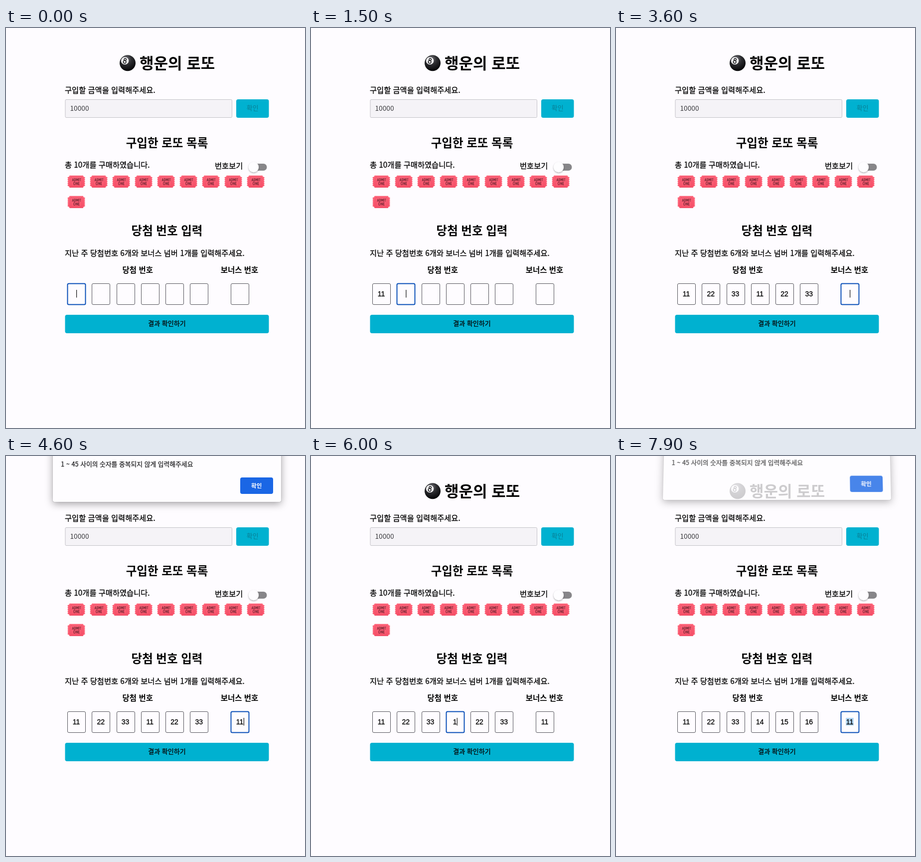
These frames come from a looping animation (600 by 802 pixels, 8000 ms). An HTML page:

```html
<!DOCTYPE html>
<html lang="ko">
<head>
<meta charset="utf-8">
<title>행운의 로또</title>
<style>
  html, body { margin: 0; width: 100%; height: 100%; overflow: hidden; background: #fefcff; }
  body { position: relative; font-family: "Noto Sans CJK KR", "Noto Sans CJK", sans-serif; }
  #page { position: absolute; left: 0; top: 0; }
  text { font-size: 15.3px; fill: #060606; stroke: #060606; stroke-width: .3px; }
  .bold { font-weight: 700; stroke: none; font-size: 15.5px; }
  .h1 { font-size: 31px; }
  .h2 { font-size: 23.5px; }
  .button { font-size: 13px; }
  .faint { fill: #087f95; stroke: none; }
  .amount { font-size: 13.7px; fill: #3a3a3e; stroke: none; }
  .mid { text-anchor: middle; }
  .cell { fill: #fefcff; stroke: #55555c; }
  .cell.on { stroke: #0b50b8; stroke-width: 2; }
  .num { font: 14px "Liberation Sans", Arial, sans-serif; }
  #dialog {
    position: absolute; left: 94px; top: -60px; width: 458px; height: 152px;
    background: #fefdff; border-radius: 3px; transform-origin: 50% 100%;
    box-shadow: 0 0 1px rgba(0,0,0,.6), 0 4px 16px rgba(0,0,0,.36);
  }
  #dialog p {
    position: absolute; margin: 0; left: 16px; top: 66px; font-size: 12.8px; line-height: 20px;
    white-space: nowrap; color: #1c1c1e; -webkit-text-stroke: .25px #1c1c1e;
  }
  #dialog b {
    position: absolute; left: 376px; top: 103px; width: 65.5px; height: 32.5px; line-height: 32px;
    border-radius: 4px; background: #1a66e5; color: #fff; font-size: 11.6px; text-align: center;
  }
</style>
</head>
<body>
<svg id="page" width="600" height="802" viewBox="0 0 600 802">
  <defs>
    <radialGradient id="gloss" cx=".42" cy=".25" r=".75">
      <stop offset="0" stop-color="#77777c"/>
      <stop offset=".4" stop-color="#303034"/>
      <stop offset="1" stop-color="#040406"/>
    </radialGradient>
    <linearGradient id="pink" x2="0" y2="1">
      <stop offset="0" stop-color="#ff677c"/>
      <stop offset="1" stop-color="#fa526a"/>
    </linearGradient>
    <filter id="lift" x="-50%" y="-50%" width="200%" height="200%">
      <feDropShadow dx="0" dy="1.5" stdDeviation="1.5" flood-opacity=".35"/>
    </filter>
    <g id="ticket">
      <path d="M4.5 .5H31.7Q32 3.4 34.6 3.8V21.4Q32 21.8 31.7 24.7H4.5Q4.2 21.8 1.6 21.4V3.8Q4.2 3.4 4.5 .5Z" fill="url(#pink)"/>
      <path d="M1.7 5V21M34.5 5V21" stroke="#fb5c73" stroke-width="2.4" stroke-linecap="round" stroke-dasharray="0 3.8"/>
      <path d="M5 24.3H31.3" stroke="#e2435d" stroke-width=".7"/>
      <rect x="7.2" y="3.4" width="21.8" height="18.4" fill="none" stroke="#e0475f" stroke-width=".6"/>
      <path d="M4.8 4.5V21M31.4 4.5V21" stroke="#e0475f" stroke-width=".7" stroke-dasharray="1.3 1.2"/>
      <g fill="none" stroke="#7c2b39" stroke-width="1.05">
        <path d="M10 12L11.5 6L13 12M10.5 10.3H12.5M14.5 6.2V11.8C17.4 12.2 17.4 5.8 14.5 6.2M18.3 12V6L20 10L21.7 6V12M23.3 6V12M24.5 6.4H27.5M26 6.4V12"/>
        <path d="M14.3 13.8C12 13.8 12 19.2 14.3 19.2S16.6 13.8 14.3 13.8M18 19.5V13.7L20.6 19.2V13.4M24.5 13.9H22.4V19.1H24.5M22.4 16.5H24.2"/>
      </g>
    </g>
  </defs>

  <circle cx="244" cy="70.3" r="16" fill="url(#gloss)"/>
  <ellipse cx="238.6" cy="65.8" rx="7.7" ry="7.5" fill="#f4f3f6"/>
  <g fill="none" stroke="#18181a" stroke-width="1.5" transform="rotate(12 238.6 65.8)">
    <circle cx="238.6" cy="63.1" r="2.2"/>
    <circle cx="238.6" cy="68.1" r="2.8"/>
  </g>
  <text class="bold h1" x="268" y="81.5">행운의 로또</text>

  <text x="118" y="129.5">구입할 금액을 입력해주세요.</text>
  <rect x="119" y="143.5" width="334.5" height="36" rx="2" fill="#f5f3f7" stroke="#c3c2c7"/>
  <text class="amount" x="128.5" y="165.5">10000</text>
  <rect x="462" y="143" width="65.5" height="37" rx="4" fill="#00b1d0"/>
  <text class="button faint mid" x="494.7" y="165.4">확인</text>

  <text class="bold h2 mid" x="323" y="238.7">구입한 로또 목록</text>
  <text x="118" y="280.4">총 10개를 구매하였습니다.</text>
  <text x="419" y="282">번호보기</text>
  <rect x="489" y="272" width="34.5" height="14" rx="7" fill="#878689"/>
  <circle cx="497" cy="279" r="10.2" fill="#fefdff" filter="url(#lift)"/>
  <g id="tickets"></g>

  <text class="bold h2 mid" x="323" y="415.3">당첨 번호 입력</text>
  <text x="118" y="457">지난 주 당첨번호 6개와 보너스 넘버 1개를 입력해주세요.</text>
  <text class="bold mid" x="264.3" y="490.7">당첨 번호</text>
  <text class="bold mid" x="468.5" y="490.7">보너스 번호</text>
  <g id="cells"></g>
  <rect id="caret" y="525" width="1.2" height="15.5" fill="#111"/>

  <rect x="118.5" y="575" width="409" height="37" rx="4" fill="#00b1d0"/>
  <text class="button mid" x="323" y="597.3">결과 확인하기</text>
</svg>
<div id="dialog"><p>1 ~ 45 사이의 숫자를 중복되지 않게 입력해주세요</p><b>확인</b></div>

<script>
const LOOP = 8000, DIGIT = 7.78, BONUS = 6;
const byId = id => document.getElementById(id);

function add(parent, tag, attrs) {
  const node = document.createElementNS('http://www.w3.org/2000/svg', tag);
  for (const key in attrs) node.setAttribute(key, attrs[key]);
  return parent.appendChild(node);
}

for (let i = 0; i < 10; i++) {
  add(byId('tickets'), 'use', { href: '#ticket', x: 123 + 45 * (i % 9), y: i < 9 ? 295.3 : 336.3 });
}

const cells = Array.from({ length: 7 }, (_, i) => {
  const x = i === BONUS ? 469 : 141 + 49.25 * i, g = byId('cells');
  return {
    x,
    box: add(g, 'rect', { class: 'cell', x: Math.round(x) - 17.5, y: 512.5, width: 36, height: 42, rx: 2.5 }),
    mark: add(g, 'rect', { x: x - DIGIT, y: 525, width: 2 * DIGIT, height: 15.5, fill: '#b1d5f5' }),
    label: add(g, 'text', { class: 'num mid', x, y: 537.7 })
  };
});

// Each event: time, cell, new value. Without a value it only moves the focus.
const events = [[0, 0]];
function type(cell, number, first, second) {
  events.push([first, cell, number[0]], [second, cell, number]);
}
type(0, '11', 1100, 1300);
['22', '33', '11', '22', '33'].forEach((n, i) => type(i + 1, n, 1600 + 400 * i, 1800 + 400 * i));
type(BONUS, '11', 3800, 4000);
events.push([5400, 3]);
type(3, '14', 5900, 6200);
type(4, '15', 6600, 7000);
type(5, '16', 7400, 7600);

function stateAt(t) {
  const values = Array(7).fill('');
  let focus = 0, selected = false, last = 0;
  for (const [time, cell, value] of events) {
    if (time > t) break;
    if (value) values[cell] = value;
    focus = value && value.length === 2 && cell < BONUS ? cell + 1 : cell;
    selected = focus !== cell && values[focus] !== '';
    last = time;
  }
  return { values, focus, selected, last };
}

const clamp = v => Math.min(1, Math.max(0, v));
const easeOut = v => 1 - (1 - v) ** 2.3;

function dialogAt(t) {
  if (t >= 7800) return easeOut(clamp((t - 7800) / 200));
  return easeOut(clamp((t - 4300) / 200)) * (1 - clamp((t - 5000) / 200));
}

function draw(t) {
  const { values, focus, selected, last } = stateAt(t);
  const shown = dialogAt(t);

  cells.forEach((cell, i) => {
    cell.box.classList.toggle('on', i === focus);
    cell.mark.style.display = selected && i === focus ? '' : 'none';
    cell.label.textContent = values[i];
  });

  const caret = byId('caret');
  const lit = shown > 0 || (t - last) % 1000 < 500;
  caret.setAttribute('x', cells[focus].x + values[focus].length * DIGIT / 2);
  caret.style.display = lit && !selected ? '' : 'none';

  const dialog = byId('dialog');
  dialog.style.opacity = shown;
  dialog.style.transform = shown === 1 ? 'none'
    : `translateY(${-20 * (1 - shown)}px) perspective(1000px) rotateX(${30 * (1 - shown)}deg)`;
}

function tick() {
  draw(performance.now() % LOOP);
  requestAnimationFrame(tick);
}
tick();
</script>
</body>
</html>
```
